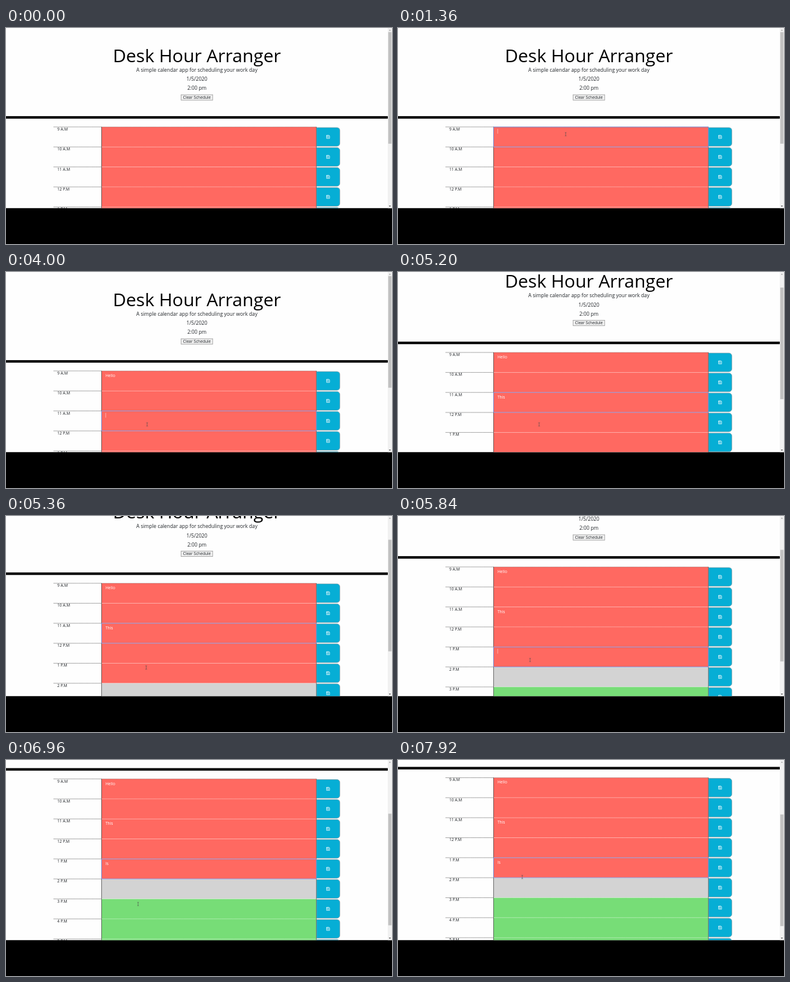
Animation of 640 by 360 pixels, one loop 8000 ms. Source, as an HTML page:

```html
<!DOCTYPE html>
<html lang="en">
<head>
<meta charset="utf-8">
<title>Day planner</title>
<style>
  html, body { margin: 0; width: 100%; height: 100%; overflow: hidden; background: #000; }
  svg { display: block; width: 100%; height: 100%; }
  text { font-family: "Open Sans", "Noto Sans", sans-serif; fill: #212529; }
  .mid { text-anchor: middle; font-size: 8.33px; }
  .small { font-size: 6.67px; }
  .note { font-size: 6.67px; fill: #fff; }
  .ring { fill: none; stroke: #6d8fe8; stroke-width: .8; }
</style>
</head>
<body>
<svg viewBox="0 0 640 360">
  <defs>
    <clipPath id="view"><rect width="640" height="300.3"/></clipPath>
    <g id="save" fill="none" stroke="#fff" stroke-width=".75">
      <path d="M-2.5-2.5H1.5L2.6-1.4V2.6H-2.5Z"/>
      <path d="M-1.5-2.4V-.7H1.1V-2.4" stroke-width=".6"/>
      <circle cy="1" r=".7" stroke-width=".6"/>
    </g>
  </defs>
  <rect width="640" height="360"/>
  <g clip-path="url(#view)">
    <rect width="640" height="301" fill="#fefefe"/>
    <g id="page">
      <text class="mid" x="316.5" y="56.5" style="font-size:30px;fill:#000">Desk Hour Arranger</text>
      <text class="mid" x="316.5" y="73.2">A simple calendar app for scheduling your work day</text>
      <text class="mid" x="316.5" y="88.4">1/5/2020</text>
      <text class="mid" x="316.5" y="103.4">2:00 pm</text>
      <rect x="290.2" y="111.2" width="52.6" height="9" fill="#efefef" stroke="#8a8a8a" stroke-width=".7"/>
      <text class="mid" x="316.5" y="118.1" style="font-size:6.67px">Clear Schedule</text>
      <rect y="146.9" width="633" height="4.2"/>
      <g id="rows"></g>
      <rect id="ring" class="ring"/>
      <path id="caret" stroke="#fff" stroke-opacity=".75" stroke-width=".6"/>
    </g>
    <rect x="633" width="7" height="301" fill="#f1f1f1"/>
    <rect id="thumb" x="633.8" width="5.4" height="186" fill="#c1c1c1"/>
    <path d="M634.8 4.4L636.5 2.4 638.2 4.4Z" fill="#a0a0a0"/>
    <path d="M634.8 296L636.5 298 638.2 296Z" fill="#505050"/>
    <g id="mouse">
      <path id="beam" d="M-1.3-3Q0-3 0-2.3 0-3 1.3-3M0-2.5V2.5M-1.3 3Q0 3 0 2.3 0 3 1.3 3" fill="none" stroke="#4a4a4a" stroke-width=".6"/>
      <path id="arrow" d="M0 0V7L1.7 5.5 2.7 8 3.8 7.5 2.8 5.1H5Z" fill="#fff" stroke="#222" stroke-width=".5"/>
    </g>
  </g>
</svg>
<script>
const LOOP = 8000, STEP = 80;
const TOP = 164.9, PITCH = 100 / 3, LEFT = 158.5, RIGHT = 514.6;
const $ = id => document.getElementById(id);
const rowTop = i => TOP + i * PITCH;

const edits = [
  { row: 0, click: 1360, end: 2240, word: 'Hello', keys: [1680, 1920, 2000, 2080, 2160] },
  { row: 2, click: 3920, end: 4800, word: 'This', keys: [4320, 4480, 4560, 4640] },
  { row: 4, click: 5760, end: 6400, word: 'Is', keys: [6160, 6320] }
];
const saveClick = 2320;

// wheel ticks: start, distance
const ticks = [[4860, 26.67], [5140, 26.67], [5420, 26.66], [6720, 27.7], [6760, 27.7]];
const TICK = 240;

// pointer stops: time, x, y
const stops = [
  [400, 594, 118], [1280, 278, 177], [2000, 278, 177], [2300, 534, 182], [2360, 534, 182],
  [2720, 278, 177], [3440, 278, 177], [3880, 234, 254], [5280, 234, 254], [5680, 219, 240],
  [7040, 219, 240], [7600, 201, 200], [7920, 206, 195]
];

const ease = p => { p = Math.min(1, Math.max(0, p)); return p * p * (3 - 2 * p); };

function set(el, attrs) {
  for (const k in attrs) el.setAttribute(k, attrs[k]);
}

function show(el, on) {
  el.style.display = on ? '' : 'none';
}

function buildRows() {
  let out = '';
  for (let i = 0; i < 9; i++) {
    const y = rowTop(i), hour = 9 + i;
    const label = `${hour > 12 ? hour - 12 : hour} ${hour < 12 ? 'A' : 'P'}.M`;
    const fill = hour < 14 ? '#ff6961' : hour === 14 ? '#d3d3d3' : '#77dd77';
    out += `<rect x="${LEFT}" y="${y}" width="${RIGHT - LEFT}" height="${PITCH}" fill="${fill}"/>
      <path d="M79 ${y}H158" stroke="#222" stroke-width=".65" stroke-dasharray="1.25 .85"/>
      <path d="M${LEFT} ${y}H${RIGHT}" stroke="${i ? '#fff' : '#444'}" stroke-opacity=".75" stroke-width=".65" stroke-dasharray="1.25 .85"/>
      <path d="M${LEFT} ${y}v${PITCH}M${RIGHT} ${y}v${PITCH}" stroke="#222" stroke-width=".65"/>
      <path d="M515 ${y + 1}h33.6a5 5 0 0 1 5 5v21.2a5 5 0 0 1 -5 5h-33.6z" fill="#06aed5" stroke="#8b9ca3" stroke-width=".7"/>
      <use href="#save" x="534" y="${y + 16.5}"/>
      <text class="small" x="85" y="${y + 6}">${label}</text>
      <text class="note" id="note${i}" x="164.9" y="${y + 10}"></text>`;
  }
  $('rows').innerHTML = out;
}

function pointerAt(t) {
  let i = 0;
  while (i < stops.length - 2 && t >= stops[i + 1][0]) i++;
  const [t0, x0, y0] = stops[i], [t1, x1, y1] = stops[i + 1];
  const p = ease((t - t0) / (t1 - t0));
  return [x0 + (x1 - x0) * p, y0 + (y1 - y0) * p];
}

function drawEdits(t) {
  const caret = $('caret');
  show(caret, false);
  for (const e of edits) {
    const note = $('note' + e.row);
    note.textContent = e.word.slice(0, e.keys.filter(k => k <= t).length);
    if (t >= e.click && t < e.end) {
      const x = 165.3 + (note.textContent ? note.getComputedTextLength() : 0);
      set(caret, { d: `M${x} ${rowTop(e.row) + 3.2}v8` });
      show(caret, true);
    }
  }
}

function drawRing(t) {
  const ring = $('ring');
  const edit = edits.filter(e => e.click <= t).pop();
  show(ring, edit);
  if (!edit) return;
  const saved = edit.row === 0 && t >= saveClick;
  const x = saved ? 514.6 : LEFT;
  set(ring, {
    x, y: rowTop(edit.row) + .1, rx: saved ? 1 : 0,
    width: (saved ? 554.3 : RIGHT) - x, height: PITCH - .2
  });
}

function draw(t) {
  const scroll = ticks.reduce((s, [at, d]) => s + d * ease((t - at) / TICK), 0);
  set($('page'), { transform: `translate(0 ${-scroll})` });
  set($('thumb'), { y: 6.8 + scroll * .62 });
  drawEdits(t);
  drawRing(t);
  const [x, y] = pointerAt(t);
  const inField = x > LEFT && x < RIGHT && y > TOP - scroll;
  set($('mouse'), { transform: `translate(${x} ${y})` });
  show($('mouse'), t >= 480);
  show($('beam'), inField);
  show($('arrow'), !inField);
}

buildRows();
const start = performance.now();
function tick() {
  const t = (performance.now() - start) % LOOP;
  draw(Math.floor(t / STEP) * STEP);
  requestAnimationFrame(tick);
}
tick();
</script>
</body>
</html>
```
